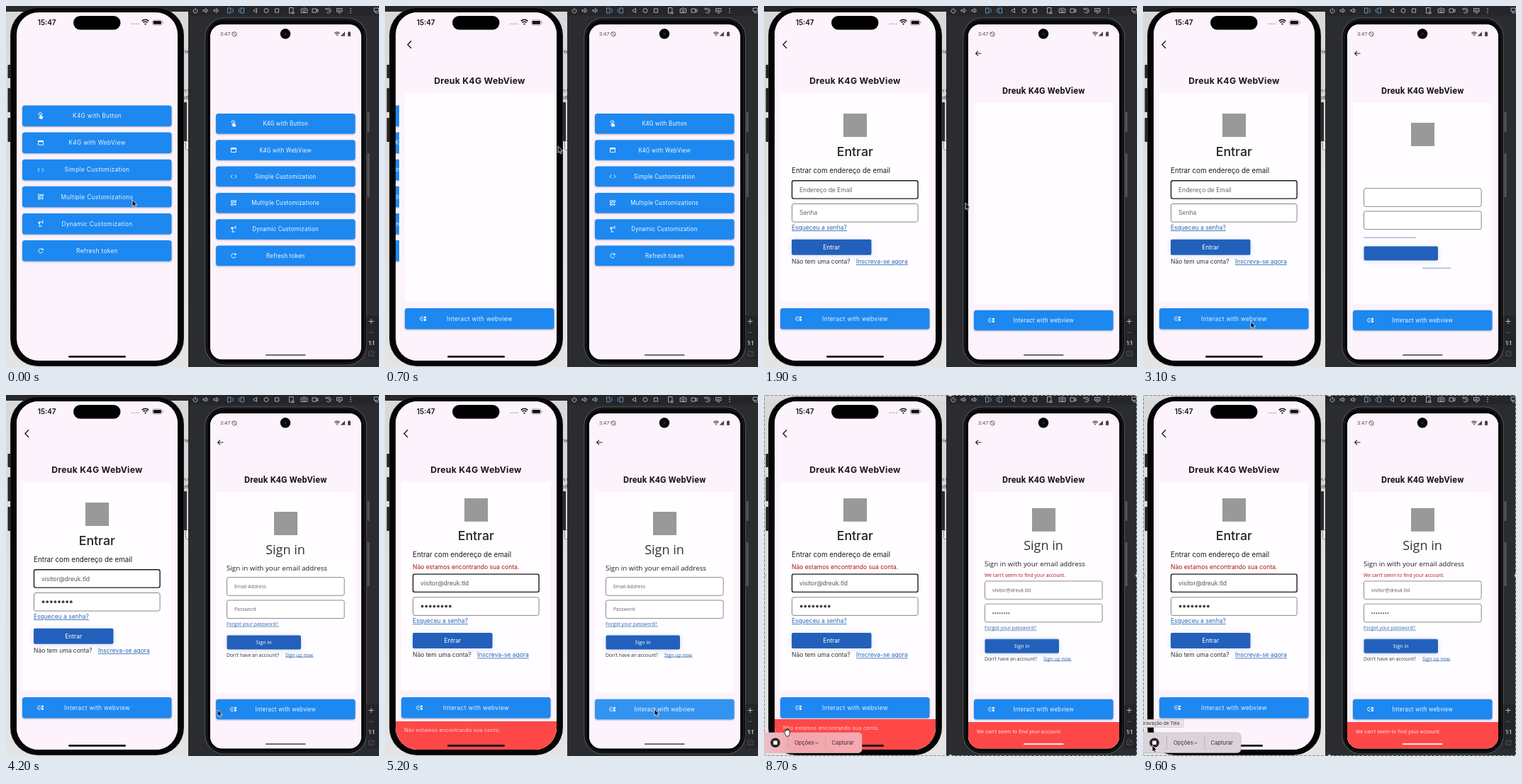
These frames come from a looping animation (526 px wide and 510 px high, 9700 ms). An HTML page:

```html
<!DOCTYPE html>
<html lang="en">
<head>
<meta charset="utf-8">
<title>Two phones sign-in demo</title>
<style>
html, body { margin: 0; width: 100%; height: 100%; overflow: hidden; background: #2b2c30; }
svg { display: block; width: 526px; height: 510px; }
text { white-space: pre; }
.i { font-family: Inter, "Liberation Sans", sans-serif; }
.r { font-family: Roboto, "Noto Sans", sans-serif; }
.o { font-family: "Open Sans", "Noto Sans", sans-serif; }
.mid { text-anchor: middle; }
.btn { fill: #1d88f0; filter: drop-shadow(0 1px 1px rgba(40, 50, 90, .36)); }
.submit { fill: #2260bb; filter: drop-shadow(0 1px 4px rgba(60, 110, 200, .2)); }
.link { fill: #2a66b5; text-decoration: underline; text-decoration-skip-ink: none; }
.line { fill: none; stroke: currentColor; stroke-width: .9; }

/* Hard changes hold each value until the next key. */
[class*="at-"] { animation: 9700ms step-end infinite; }
.at-l-form { animation-name: l-form; }
.at-l-fill { animation-name: l-fill; }
.at-l-hint { animation-name: l-hint; }
.at-l-err { animation-name: l-err; }
.at-l-up { animation-name: l-up; }
.at-l-down { animation-name: l-down; }
.at-r-skel { animation-name: r-skel; }
.at-r-text { animation-name: r-text; }
.at-r-fill { animation-name: r-fill; }
.at-r-hint { animation-name: r-hint; }
.at-r-err { animation-name: r-err; }
.at-r-up { animation-name: r-up; }
.at-r-down { animation-name: r-down; }
.at-bar { animation-name: bar; }
.at-tools { animation-name: tools; }
.at-tip { animation-name: tip; }
.at-arrow { animation-name: arrow; }
.at-hand { animation-name: hand; }
@keyframes l-form { 0% { opacity: 0 } 19.59% { opacity: 1 } }
@keyframes l-fill { 0% { opacity: 0 } 35.05% { opacity: 1 } }
@keyframes l-hint { 0% { opacity: 1 } 35.05%, 100% { opacity: 0 } }
@keyframes l-err { 0% { opacity: 0 } 51.03% { opacity: 1 } }
@keyframes l-up { 0% { transform: none } 51.03%, 100% { transform: translateY(-6.2px) } }
@keyframes l-down { 0% { transform: none } 51.03%, 100% { transform: translateY(6.3px) } }
@keyframes r-skel { 0% { opacity: 0 } 27.84% { opacity: 1 } }
@keyframes r-text { 0% { opacity: 0 } 34.02% { opacity: 1 } }
@keyframes r-fill { 0% { opacity: 0 } 55.67% { opacity: 1 } }
@keyframes r-hint { 0% { opacity: 1 } 55.67%, 100% { opacity: 0 } }
@keyframes r-err { 0% { opacity: 0 } 59.28% { opacity: 1 } }
@keyframes r-up { 0% { transform: none } 59.28%, 100% { transform: translateY(-5.2px) } }
@keyframes r-down { 0% { transform: none } 59.28%, 100% { transform: translateY(5.3px) } }
@keyframes bar { 0% { fill: #5c5860 } 59.8%, 100% { fill: #fff } }
@keyframes tools { 0% { opacity: 0 } 86.6% { opacity: 1 } }
@keyframes tip { 0% { opacity: 0 } 96.9% { opacity: 1 } }
@keyframes arrow { 0% { opacity: 1 } 88.6% { opacity: 0 } 92.7%, 100% { opacity: 1 } }
@keyframes hand { 0% { opacity: 0 } 88.6% { opacity: 1 } 92.7%, 100% { opacity: 0 } }

/* Smooth motion */
#l-menu, #l-page { animation: 9700ms cubic-bezier(.25, .7, .25, 1) infinite; }
#l-menu { animation-name: l-menu; }
#l-page { animation-name: l-page; }
#r-page { animation: r-page 9700ms ease-out infinite; transform-origin: 394px 262px; }
#l-snack, #r-snack { animation: 9700ms cubic-bezier(.4, 0, .2, 1) infinite; }
#l-snack { animation-name: l-snack; }
#r-snack { animation-name: r-snack; }
#glow { animation: glow 9700ms linear infinite; }
#cursor { animation: cursor 9700ms ease-in-out infinite; }
.press { fill: #fff; opacity: 0; animation: 9700ms linear infinite; }
#press-l1 { animation-name: press-l1; }
#press-r1 { animation-name: press-r1; }
#press-l2 { animation-name: press-l2; }
#press-r2 { animation-name: press-r2; }
@keyframes l-menu { 0%, 3.6% { transform: none } 8.76%, 100% { transform: translateX(-76px) } }
@keyframes l-page { 0%, 3.6% { transform: translateX(228px) } 8.76%, 100% { transform: none } }
@keyframes r-page { 0%, 13.9% { opacity: 0; transform: scale(.88) } 17%, 100% { opacity: 1; transform: none } }
@keyframes l-snack { 0%, 51.86% { transform: translateY(44px) } 54.43%, 94.85% { transform: none } 97.4%, 100% { transform: translateY(44px) } }
@keyframes r-snack { 0%, 59.4% { transform: translateY(40px) } 61.96%, 100% { transform: none } }
@keyframes glow { 0%, 94.85% { opacity: 1 } 97.4%, 100% { opacity: 0 } }
@keyframes press-l1 { 0%, 2.9% { opacity: 0 } 3.9%, 5% { opacity: .16 } 7.5%, 100% { opacity: 0 } }
@keyframes press-r1 { 0%, 10.6% { opacity: 0 } 11.6%, 14% { opacity: .17 } 17%, 100% { opacity: 0 } }
@keyframes press-l2 { 0%, 32.2% { opacity: 0 } 33.2%, 34.5% { opacity: .13 } 37%, 100% { opacity: 0 } }
@keyframes press-r2 { 0%, 52.4% { opacity: 0 } 53.4%, 55% { opacity: .1 } 58%, 100% { opacity: 0 } }
@keyframes cursor {
  0%, 1% { transform: translate(178px, 274px) }
  3.1%, 4.6% { transform: translate(140px, 190px) }
  9.8%, 11.3% { transform: translate(344px, 206px) }
  13.4%, 16% { transform: translate(322px, 230px) }
  27%, 36.1% { transform: translate(152px, 446px) }
  48.45%, 55.67% { transform: translate(380px, 444px) }
  62%, 84.5% { transform: translate(417px, 370px) }
  88.66%, 92% { transform: translate(28px, 471px) }
  96.9%, 100% { transform: translate(13px, 495px) }
}
</style>
</head>
<body>
<svg id="stage" viewBox="0 0 526 510"></svg>
<script>
const PAPER = '#fcf3fc', RED = '#fe4848';

const rect = (x, y, w, h, r = 0, attrs = '') =>
  `<rect x="${x}" y="${y}" width="${w}" height="${h}" rx="${r}" ${attrs}/>`;
const text = (x, y, size, cls, str, fill = '#fff', attrs = '') =>
  `<text x="${x}" y="${y}" font-size="${size}" class="${cls}" fill="${fill}" ${attrs}>${str}</text>`;
const line = (d, attrs = '') => `<path class="line" d="${d}" ${attrs}/>`;
const dots = (n, x, y, step, r, fill) =>
  Array.from({length: n}, (_, k) => `<circle cx="${x + k * step}" cy="${y}" r="${r}" fill="${fill}"/>`).join('');
const group = (cls, ...kids) => `<g class="${cls}">${kids.join('')}</g>`;

const icons = {
  touch: line('M-2.2-.6A2.4 2.4 0 1 1 1.2-.6') + '<path fill="#fff" d="M-1.1-2.4V1.6L-2.3 1-2.9 1.7-.7 4.2H2.6L3.1 1 .2-.2V-2.4Z"/>',
  web: line('M-3.5-2.9H3.5V3H-3.5Z') + rect(-3.5, -3, 7, 1.8, 0, 'fill="#fff"'),
  code: line('M-1.7-2.5-4 0-1.7 2.5M1.7-2.5 4 0 1.7 2.5'),
  tiles: line('M-3.4-3.4H-.7V-.7H-3.4ZM.9-3.4H3.4V-.7H.9ZM-3.4 .9H-.7V3.4H-3.4ZM2.2 .6V3.9M.5 2.2H3.9'),
  arm: line('M-3 3.6H1.8M-.8 3.4-2.2-1.6 1.4-2.8M3.8-4H2.2V-1.2H3.8') + '<circle cx="-2.2" cy="-1.6" r="1.5" fill="#fff"/>',
  refresh: line('M2.4-1.9A3.1 3.1 0 1 0 3 .8') + '<path fill="#fff" d="M3.5-3.8V-.8H.5Z"/>',
  link: line('M-.5-2.6H-1.8A2.6 2.6 0 0 0-1.8 2.6H-.5M-2 0H.2') + rect(.9, -3, 3, 2.4, 0, 'fill="#fff"') + rect(.9, .4, 3, 2.6, 0, 'fill="#fff"')
};

const menu = [
  ['touch', 'K4G with Button'], ['web', 'K4G with WebView'], ['code', 'Simple Customization'],
  ['tiles', 'Multiple Customizations'], ['arm', 'Dynamic Customization'], ['refresh', 'Refresh token']
];

// Layout that differs between the two phones
const ios = {x: 23, w: 210.5, h: 29.5, top: 140.5, pitch: 38.1, mid: 128.5, icon: 49, font: 'i', size: 8.3, gap: .35};
const droid = {x: 296, w: 196.5, h: 28.5, top: 152, pitch: 37.3, mid: 394.2, icon: 321, font: 'r', size: 8.2, gap: .32};

const button = (p, y, icon, label, pressId) =>
  rect(p.x, y, p.w, p.h, 3.5, 'class="btn"') +
  (pressId ? rect(p.x, y, p.w, p.h, 3.5, `class="press" id="${pressId}"`) : '') +
  `<g transform="translate(${p.icon} ${y + p.h / 2})" color="#fff">${icons[icon]}</g>` +
  text(p.mid, y + p.h / 2 + 3, p.size, p.font + ' mid', label, '#e9f3ff', `letter-spacing="${p.gap}"`);

const menuPage = (p, pressId) => menu.map(([icon, label], k) =>
  button(p, p.top + k * p.pitch, icon, label, k === 1 ? pressId : '')).join('');

const field = (x, y, w, h, stroke, width) =>
  rect(x, y, w, h, 2.5, `fill="#fff" stroke="${stroke}" stroke-width="${width}"`);

function iosForm() {
  const t = (x, y, str, fill = '#333', cls = 'i') => text(x, y, 8.5, cls, str, fill);
  return group('at-l-form',
    group('at-l-up',
      rect(112, 152, 33, 33, 0, 'fill="#999"'),
      text(128.3, 211.7, 17.7, 'i mid', 'Entrar', '#222', 'font-weight="500"'),
      text(39, 235.5, 9.8, 'i', 'Entrar com endereço de email', '#1c1c1c')),
    group('at-l-err', t(39, 246, 'Não estamos encontrando sua conta.', '#a81414')),
    group('at-l-down',
      field(39.5, 246.7, 177.6, 25.4, '#1c1c1c', 1.4),
      field(39.5, 279.5, 177.6, 25.6, '#858585', 1),
      group('at-l-hint', t(50, 262.5, 'Endereço de Email', '#666'), t(50, 295.3, 'Senha', '#666')),
      group('at-l-fill', t(50, 262.5, 'visitor@dreuk.tld', '#555'), dots(8, 52.6, 292.2, 5.6, 1.9, '#444')),
      t(39, 316, 'Esqueceu a senha?', '#2a66b5', 'i link'),
      rect(39, 329.8, 112.5, 22, 2, 'class="submit"'),
      t(95.2, 344, 'Entrar', '#fff', 'i mid'),
      t(39, 364.2, 'Não tem uma conta?'),
      t(130, 364.2, 'Inscreva-se agora', '#2a66b5', 'i link')));
}

function droidForm() {
  const t = (x, y, str, fill = '#333', cls = 'o') => text(x, y, 6.85, cls, str, fill);
  return group('at-r-skel',
    group('at-r-up',
      rect(378, 165, 33, 33, 0, 'fill="#999"'),
      group('at-r-text',
        text(394, 224.5, 18, 'o mid', 'Sign in', '#333'),
        text(311, 247.5, 9.8, 'o', 'Sign in with your email address', '#222'))),
    group('at-r-err', t(311, 257, "We can't seem to find your account.", '#a81414')),
    group('at-r-down',
      field(311.5, 257.7, 165.6, 25.6, '#7c7c7c', .9),
      field(311.5, 290, 165.6, 25.6, '#7c7c7c', .9),
      rect(311.5, 339.5, 104.5, 20, 2, 'class="submit"'),
      line('M311 327.2H385M394 370.3H434', 'color="#4a6fa5" style="stroke-width:.7"'),
      group('at-r-text',
        group('at-r-hint', t(322, 273, 'Email Address', '#666'), t(322, 305.3, 'Password', '#666')),
        group('at-r-fill', t(322, 273, 'visitor@dreuk.tld', '#555'), dots(8, 323, 303, 3.2, .95, '#444')),
        t(311, 326.4, 'Forgot your password?', '#2a66b5'),
        text(363.7, 352, 7.2, 'o mid', 'Sign in', '#fff'),
        t(311, 369.6, "Don't have an account?"),
        t(394, 369.6, 'Sign up now', '#2a66b5'))));
}

const wifi = (x, y, s, fill) =>
  `<g transform="translate(${x} ${y}) scale(${s})" color="${fill}">` +
  line('M-5-4.2A7 7 0 0 1 5-4.2M-3.1-2A4.4 4.4 0 0 1 3.1-2', 'style="stroke-width:1.7"') +
  `<path fill="${fill}" d="M0 1.6-1.6-.1A2.3 2.3 0 0 1 1.6-.1Z"/></g>`;

const desktop =
  rect(0, 0, 257, 510, 0, 'fill="url(#desk)"') +
  rect(0, 0, 257, 8, 0, 'fill="#28282a"') +
  group('at-tools', rect(0, 0, 257, 8, 0, 'fill="#dcdcdd"')) +
  rect(249, 60, 8, 135, 0, 'fill="#d4d4d6"') +
  text(250, 67, 7, 'i', 'rie', '#333') + text(250, 122, 7, 'i', 'n t', '#333') + text(249, 132, 7, 'i', 'oth', '#333') +
  rect(253.5, 190.5, 8, 13, 2, 'fill="#eee" stroke="#888"') +
  rect(257, 0, 269, 510, 0, 'fill="#2b2c30"');

const emulatorBar =
  rect(257, 0, 269, 13.5, 0, 'fill="#25262a"') +
  `<g color="#b9bcc2" transform="translate(0 6.5)">` +
  line('M265.2-2A3 3 0 1 0 268.8-2M267-4V0') +
  [282, 297].map(x => line(`M${x - 4}-1H${x - 2}L${x}-3V3L${x - 2} 1H${x - 4}ZM${x + 1.5}-2A3 3 0 0 1 ${x + 1.5} 2`)).join('') +
  line('M312.5-3.5H317V3.5H312.5ZM319-3A4 4 0 0 1 319 3M331-3.5H335.5V3.5H331ZM329.5-3A4 4 0 0 0 329.5 3', 'style="stroke:#6f9fd0"') +
  line('M353.5-3V3L348.7 0ZM379.4-2.6H384.6V2.6H379.4ZM399.5-4H405V1M399.5-4V3.6H402M403 2H406V4.2H403Z') +
  '<circle class="line" cx="367" cy="0" r="3"/><circle class="line" cx="420.5" cy=".4" r="1.6"/>' +
  line('M416.2-2.4H418.5L419.2-3.5H421.8L422.5-2.4H424.8V3H416.2ZM432-2.6H437.5V2.6H432ZM437.5-.8 440-2V2L437.5 .8') +
  line('M452-2A3.4 3.4 0 1 1 452 2M451-4V-1.6H453.4M455-2V0L457 1M466.5-3H474V1.5H466.5ZM469 3.4H472M468-.5H472') +
  [-3, 0, 3].map(y => `<circle cx="486" cy="${y}" r=".8" fill="#b9bcc2"/>`).join('') +
  line('M519-3.5H525.5V1H519ZM521 1V3.4H527') + '</g>';

const iosPhone =
  [[83, 19], [116, 34], [158, 34]].map(([y, h]) => rect(2.5, y, 4, h, 1, 'fill="#252527"')).join('') +
  rect(250, 136, 5, 55, 1, 'fill="#2b2b30"') +
  rect(6, 2.3, 245, 506.7, 39, 'fill="#2a2a2c"') +
  rect(6.8, 3, 243.4, 505.2, 38, 'fill="#050506"') +
  `<g clip-path="url(#clip-l)">` +
  rect(15, 9, 227, 492, 0, `fill="${PAPER}"`) +
  `<g id="l-menu">${menuPage(ios, 'press-l1')}</g>` +
  `<g id="l-page">` + rect(15, 9, 227, 492, 0, `fill="${PAPER}"`) +
  line('M32 49.3 27 54.5 32 59.7', 'color="#222" style="stroke-width:1.5"') +
  text(128.5, 109.7, 12.2, 'i mid', 'Dreuk K4G WebView', '#1a171b', 'font-weight="700" letter-spacing=".3"') +
  rect(23, 123, 210, 294.5, 0, 'fill="#fffdff"') + iosForm() +
  button(ios, 427, 'link', 'Interact with webview', 'press-l2') + '</g>' +
  `<g id="l-snack">` + rect(15, 458, 227, 50, 0, `fill="${RED}"`) +
  text(27, 473, 7.2, 'i', 'Não estamos encontrando sua conta.', '#ffd6d2', 'letter-spacing=".25"') + '</g>' +
  rect(88, 494, 81, 2.8, 1.4, 'fill="#120b0d"') + '</g>' +
  rect(95, 14, 66.5, 19.5, 9.7, 'fill="#000"') +
  text(44.8, 27.2, 9.9, 'i', '15:47', '#111', 'font-weight="600"') +
  dots(4, 177.5, 25.2, 3.1, .8, '#8a858c') +
  wifi(196.5, 25.3, .95, '#111') +
  rect(206.5, 19.8, 13.6, 7.2, 2.2, 'fill="none" stroke="#999" stroke-width=".8"') +
  rect(207.7, 21, 11.2, 4.8, 1.2, 'fill="#111"') + rect(220.8, 22, 1, 2.6, .5, 'fill="#999"');

const droidPhone =
  rect(509.5, 150, 3, 28, 1, 'fill="#55565b"') + rect(509.5, 208, 3, 62, 1, 'fill="#55565b"') +
  rect(280.8, 17, 227.6, 490, 27, 'fill="#0a0a0b" stroke="#55565a" stroke-width="1.1"') +
  rect(283.5, 19.7, 222, 484.6, 24, 'fill="#050505" stroke="#242528"') +
  `<g clip-path="url(#clip-r)">` +
  rect(288, 26, 213, 473.5, 0, `fill="${PAPER}"`) + menuPage(droid, 'press-r1') +
  `<g id="r-page">` + rect(288, 26, 213, 473.5, 0, `fill="${PAPER}"`) +
  line('M306.5 67H298.7M302 63.6 298.6 67 302 70.4', 'color="#222" style="stroke-width:1.1"') +
  text(394.2, 123.8, 12.4, 'r mid', 'Dreuk K4G WebView', '#1a171b', 'font-weight="600" letter-spacing=".15"') +
  rect(296, 137, 196.5, 284, 0, 'fill="#fffdff"') + droidForm() +
  button(droid, 429.7, 'link', 'Interact with webview', 'press-r2') + '</g>' +
  `<g id="r-snack">` + rect(288, 462, 213, 45, 0, `fill="${RED}"`) +
  text(300, 478, 7, 'r', "We can't seem to find your account.", '#ffe2df', 'letter-spacing=".27"') + '</g>' +
  rect(366, 492.2, 56.5, 1.9, .9, 'class="at-bar"') + '</g>' +
  '<circle cx="394" cy="39.3" r="7.2" fill="#060607"/><circle cx="394" cy="39.3" r="2" fill="#1d2226"/>' +
  text(302, 42.3, 7.6, 'r', '3:47', '#555') +
  line('M322 36.5 325 38V40C325 41.5 323.5 42.5 322 43 320.5 42.5 319 41.5 319 40V38ZM319.5 37 325 42.5', 'color="#555"') +
  wifi(467, 41.5, .72, '#444') +
  '<path fill="#444" d="M471.6 42.6H478V36.2Z"/>' + rect(482, 37, 4, 5.8, .6, 'fill="#444"') + rect(483, 36.2, 2, 1, 0, 'fill="#444"');

const zoomBar =
  rect(508.5, 437, 18, 62, 0, 'fill="#242529"') +
  line('M511.5 445.5H518.5M515 442V449', 'color="#c8cad0"') + line('M512 461.3H518', 'color="#5c5e64"') +
  text(515.3, 478.6, 7, 'i mid', '1:1', '#d5d7dc', 'font-weight="600"') +
  line('M511.5 488H519V494.5H511.5ZM513 493 517.5 489.5', 'color="#54565c"');

const handles = [0, 263, 526].flatMap(x => [0, 255, 510].map(y =>
  x === 263 && y === 255 ? '' : `<circle cx="${x}" cy="${y}" r="2.2" fill="#ddd" stroke="#777" stroke-width=".6"/>`)).join('');

const recorder = group('at-tools',
  rect(.5, .5, 525, 509, 0, 'fill="none" stroke="#555" stroke-opacity=".7"'),
  rect(.5, .5, 525, 509, 0, 'fill="none" stroke="#f2f2f2" stroke-opacity=".7" stroke-dasharray="3 3"'),
  handles,
  rect(-8, 477, 146, 28.5, 5, 'fill="#dcd3da" stroke="#b9b0b7" stroke-width=".6"'),
  rect(-8, 477, 146, 28.5, 5, 'id="glow" fill="url(#pink)"'),
  line('M33.5 481V501M87 481V501', 'color="#b7a3ab" style="stroke-width:.7"'),
  '<circle cx="16" cy="491.3" r="6.8" fill="#2a2426"/>', rect(13.2, 488.5, 5.6, 5.6, .8, 'fill="#fff"'),
  text(43, 494, 7.6, 'i', 'Opções', '#47292f'), line('M72.3 490.6 74.4 492.7 76.5 490.6', 'color="#47292f"'),
  text(95.5, 494, 7.6, 'i', 'Capturar', '#47292f'),
  group('at-tip', rect(-4, 458.5, 61, 11, 1, 'fill="#e6e1e6" stroke="#c4bfc4" stroke-width=".6"'),
    text(-3, 466.4, 6.6, 'i', 'Gravação de Tela', '#333')));

const pointer = `<g id="cursor"><path class="at-arrow" d="M0 0V9.2L2.2 7.3 3.7 10.6 5.3 9.9 3.9 6.7H6.8Z" fill="#000" stroke="#fff" stroke-width=".8"/>` +
  `<path class="at-hand" d="M1.6 7 0 4.6 1.4 3.7 2.4 4.6V1.2L3.7 .9 4.2 3.3 4.4 .3 5.8 .3 6 3.3 6.8 1 8 1.4V7.6L7 11H3.2Z" fill="#fff" stroke="#111" stroke-width=".8"/></g>`;

document.getElementById('stage').innerHTML =
  `<defs><clipPath id="clip-l">${rect(15, 9, 227, 492, 31)}</clipPath>` +
  `<clipPath id="clip-r">${rect(288, 26, 213, 473.5, 17)}</clipPath>` +
  `<linearGradient id="desk" x2="0" y2="1"><stop stop-color="#d8d8d9"/><stop offset="1" stop-color="#e4e4e4"/></linearGradient>` +
  `<linearGradient id="pink"><stop offset=".1" stop-color="#e9bfc5"/><stop offset=".35" stop-color="#f3a6ad"/><stop offset="1" stop-color="#f4aab0"/></linearGradient></defs>` +
  desktop + iosPhone + emulatorBar + droidPhone + zoomBar + recorder + pointer;
</script>
</body>
</html>
```
